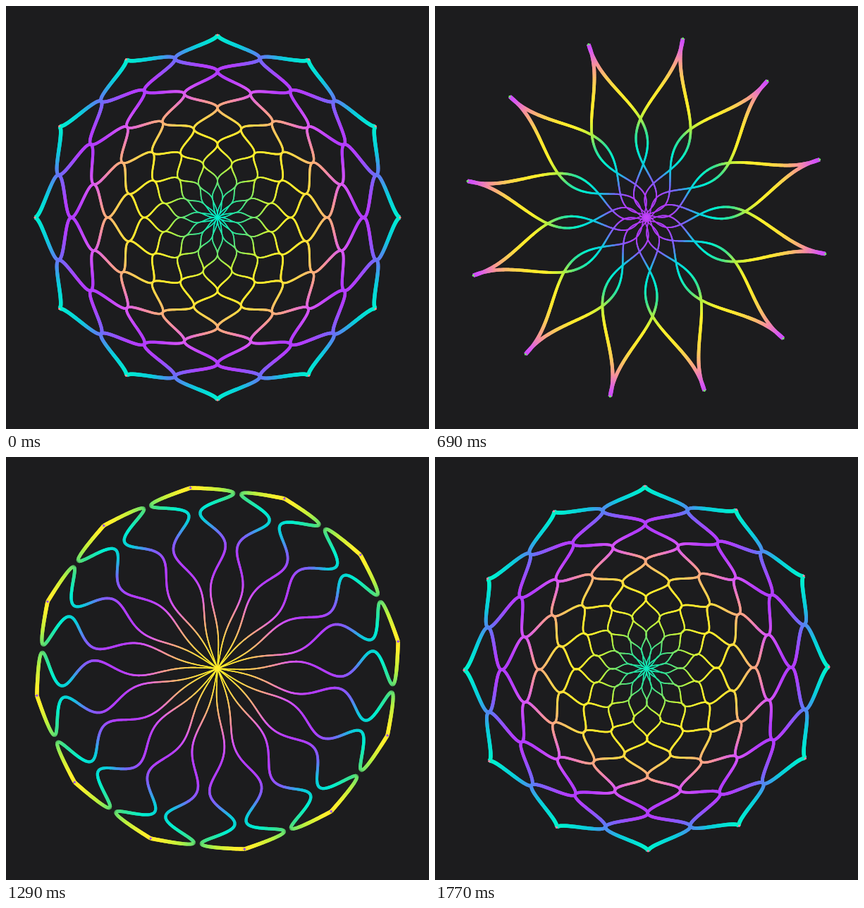
Animation of 600 by 600 pixels, one loop 1800 ms. Source, as an HTML page with a canvas:

```html
<!DOCTYPE html>
<html lang="en">
<head>
<meta charset="utf-8">
<title>Woven mandala</title>
<style>
  html, body { margin: 0; width: 100%; height: 100%; overflow: hidden; background: #1c1c1e; }
  canvas { display: block; width: 600px; height: 600px; }
</style>
</head>
<body>
<canvas id="stage" width="600" height="600"></canvas>
<script>
const ctx = document.getElementById('stage').getContext('2d');
const LOOP = 1800, TICK = 30, ARMS = 12, R = 259, STEPS = 400;
const TAU = Math.PI * 2, TILT = TAU / ARMS / 4;

// Evenly spaced colours of a closed wheel
const WHEEL = ['#00f0d0', '#3ce18c', '#bef03c', '#fff02c', '#ffe82e', '#fdcd55',
  '#fa9696', '#d755f5', '#b43cff', '#b23eff', '#7864fa', '#0acddc']
  .map(hex => [1, 3, 5].map(i => parseInt(hex.slice(i, i + 2), 16)));

function color(x) {
  const n = WHEEL.length, at = (x - Math.floor(x)) * n;
  const i = Math.floor(at), a = WHEEL[i % n], b = WHEEL[(i + 1) % n];
  return `rgb(${a.map((v, j) => Math.round(v + (b[j] - v) * (at - i)))})`;
}

// One strand from tip to centre: a wave narrowing along a line tilted
// half a wedge from its arm, with its bends crowding in or out over time
function strand(t) {
  const waves = 6 + 4 * Math.cos(TAU * t);
  const ease = 0.6 * Math.sin(2 * TAU * t) - 0.8 * Math.sin(TAU * t);
  const points = [];
  let length = 0;
  for (let i = 0; i <= STEPS; i++) {
    const u = i / STEPS;
    const reach = ease < 0 ? (1 - u) ** (1 - ease) : 1 - u ** (1 + ease);
    const along = R * Math.cos(TILT) * reach;
    const across = -R * Math.sin(TILT) * (1 - u) * Math.cos(Math.PI * waves * u);
    const x = along * Math.cos(TILT) - across * Math.sin(TILT);
    const y = along * Math.sin(TILT) + across * Math.cos(TILT);
    if (i) length += Math.hypot(x - points[i - 1].x, y - points[i - 1].y);
    points.push({ x, y, length });
  }
  for (const p of points) p.part = 1 - p.length / length;
  return points;
}

function draw(t) {
  const points = strand(t);
  const axes = Array.from({ length: ARMS }, (_, k) => {
    const a = (k + t) * TAU / ARMS - TAU / 4;
    return [Math.cos(a), Math.sin(a)];
  });
  ctx.fillStyle = '#1c1c1e';
  ctx.fillRect(0, 0, 600, 600);

  for (let i = STEPS; i > 0; i--) {
    const p = points[i], q = points[Math.max(0, i - 2)];
    ctx.strokeStyle = color(p.part - t);
    ctx.lineWidth = 1.3 + 4.2 * p.part;
    ctx.beginPath();
    for (const [c, s] of axes) {
      for (const side of [-1, 1]) {
        const py = p.y * side, qy = q.y * side;
        ctx.moveTo(300 + p.x * c - py * s, 300 + p.x * s + py * c);
        ctx.lineTo(300 + q.x * c - qy * s, 300 + q.x * s + qy * c);
      }
    }
    ctx.stroke();
  }

  ctx.fillStyle = color(0.5 - t);
  for (const [c, s] of axes) {
    ctx.beginPath();
    ctx.arc(300 + R * c, 300 + R * s, 1.6, 0, TAU);
    ctx.fill();
  }
}

function frame() {
  const ms = performance.now() % LOOP;
  draw(Math.floor(ms / TICK) * TICK / LOOP);
  requestAnimationFrame(frame);
}
frame();
</script>
</body>
</html>
```
